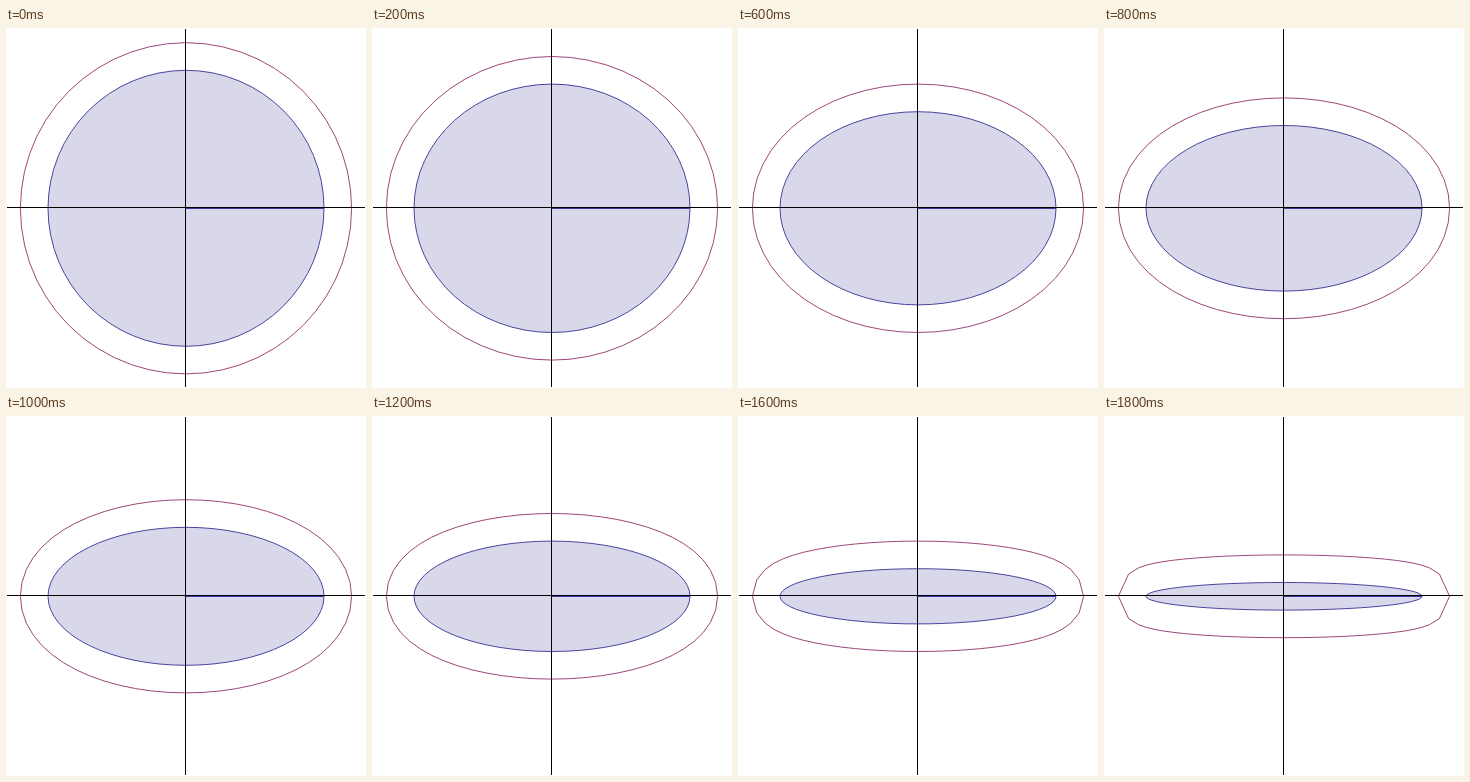
Animation, 360 px wide and 360 px high, one loop 3 s. Source, as an HTML page:

```html
<!DOCTYPE html>
<html lang="en">
<head>
<meta charset="utf-8">
<title>Parallel curve of an ellipse</title>
<style>
  html, body { margin: 0; width: 100%; height: 100%; overflow: hidden; background: #fff; }
  svg { display: block; width: 100%; height: 100%; }
</style>
</head>
<body>
<svg viewBox="0 0 360 360" fill="none">
  <ellipse id="disk" cx="180" cy="180.3" rx="138" fill="#d9d8eb" stroke="#3f3d99" stroke-width=".95"/>
  <path d="M180 180.5H318" stroke="#3f3d99"/>
  <polygon id="offset" stroke="#993d71" stroke-width=".95"/>
  <path d="M1 179.5H359M179.5 1V359" stroke="#000"/>
</svg>
<script>
const LOOP = 3000, STEP = 100, LAST = 18;
const CX = 180, CY = 180.3, A = 138, GAP = 27.6, SIDES = 56;
const disk = document.getElementById('disk');
const offset = document.getElementById('offset');

// Points at a fixed distance outside the ellipse with half-axes A and b
function parallel(b) {
  const pts = [];
  for (let i = 0; i < SIDES; i++) {
    const t = i * 2 * Math.PI / SIDES;
    const c = Math.cos(t), s = Math.sin(t);
    const n = GAP / Math.hypot(b * c, A * s);
    const x = CX + c * (A + b * n);
    const y = CY - s * (b + A * n);
    pts.push(x.toFixed(2) + ',' + y.toFixed(2));
  }
  return pts.join(' ');
}

let shown = -1;
function draw(ms) {
  const k = Math.min(LAST, Math.floor((ms % LOOP) / STEP));
  if (k === shown) return;
  shown = k;
  const b = A * (1 - k / 20);
  disk.setAttribute('ry', b);
  offset.setAttribute('points', parallel(b));
}

const start = performance.now();
function tick() {
  draw(performance.now() - start);
  requestAnimationFrame(tick);
}
tick();
</script>
</body>
</html>
```
